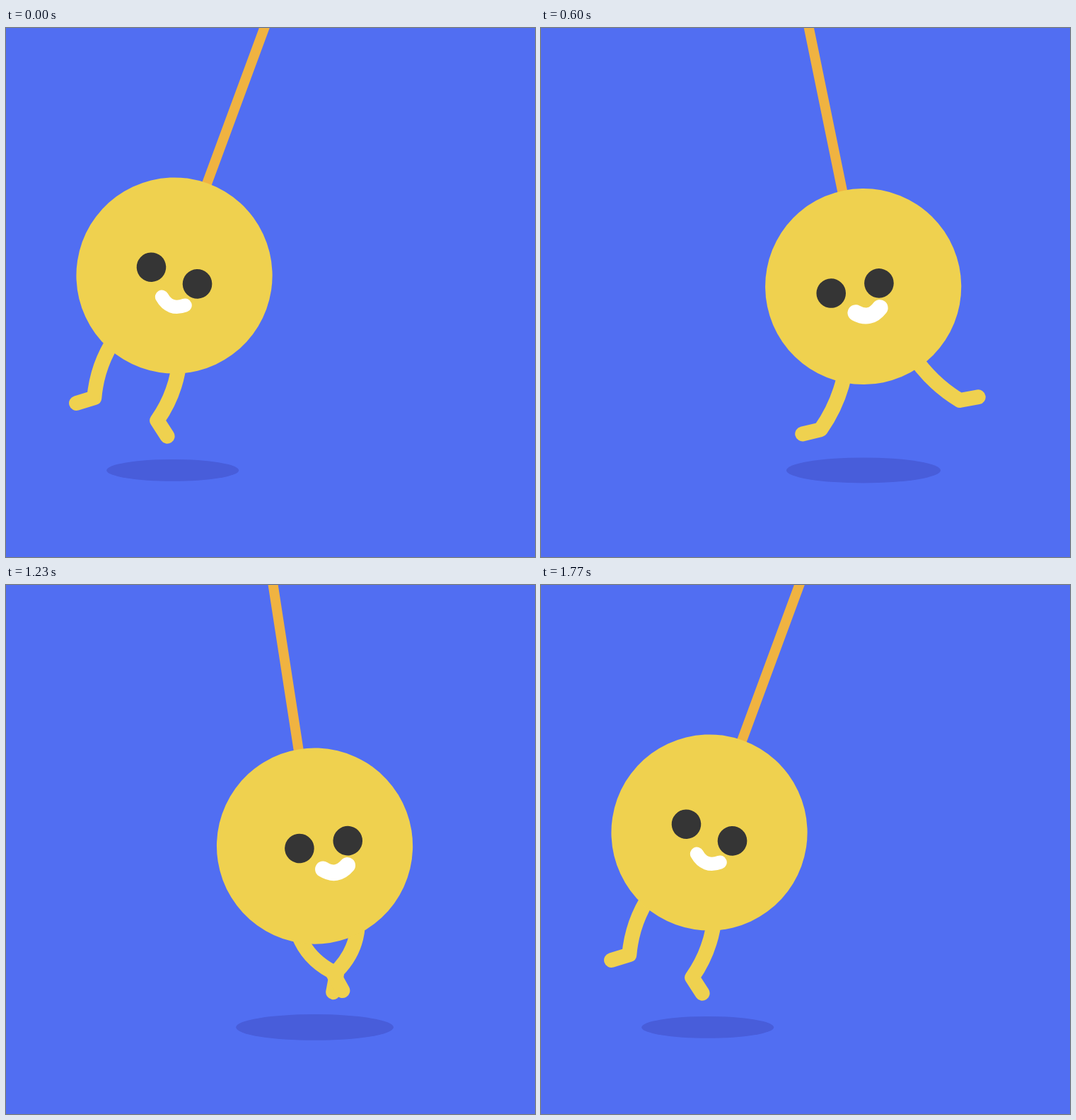
Recreate the animation shown at these times as an HTML page. Size 748 by 748 pixels, loop 1800 ms.

```html
<!DOCTYPE html>
<html lang="en">
<head>
<meta charset="utf-8">
<title>Swinging ball</title>
<style>
  html, body { margin: 0; width: 100%; height: 100%; overflow: hidden; background: #516ef2; }
  svg { display: block; width: 100%; height: 100%; }
  path, line { fill: none; stroke-linecap: round; stroke-linejoin: round; }
  .leg { stroke: #efd14f; stroke-width: 21; }
</style>
</head>
<body>
<svg viewBox="0 0 748 748">
  <ellipse id="shadow" cy="625.4" fill="#485dda"/>
  <g id="swing">
    <line x2="-1.4" y2="300" stroke="#f0b341" stroke-width="14"/>
    <g transform="translate(0 397.6)">
      <path class="leg" id="legL"/>
      <path class="leg" id="legR"/>
      <circle r="138.6" fill="#efd14f"/>
      <g id="face">
        <rect class="eye" x="-55.4" width="41.6" fill="#353535"/>
        <rect class="eye" x="13.8" width="41.6" fill="#353535"/>
        <path id="mouth" d="M-6.2 34.3Q11.2 49.3 28.6 34.3" stroke="#fff"/>
      </g>
    </g>
  </g>
</svg>
<script>
const LOOP = 1800, STEP = 30, TURN = 900, BACK = 870;
const $ = id => document.getElementById(id);
const eyes = document.querySelectorAll('.eye');
const set = (el, attrs) => {
  for (const key in attrs) el.setAttribute(key, attrs[key]);
};
const clamp = v => Math.min(1, Math.max(0, v));

// cubic-bezier(.5, 0, .5, 1)
function ease(x) {
  let lo = 0, hi = 1;
  for (let i = 0; i < 24; i++) {
    const s = (lo + hi) / 2;
    if (1.5 * s - 1.5 * s * s + s * s * s < x) lo = s; else hi = s;
  }
  return lo * lo * (3 - 2 * lo);
}

// Outward-facing leg, mirrored by side
function legPath(side, u, k) {
  const cross = -k * (1.35 + 0.35 * k);
  const hip = [45, 100];
  const ankle = [47.3 + (k > 0 ? 61.5 * k : -52 * cross), 201 - 20.5 * k * k];
  const turn = (53 + (k > 0 ? 41 * k : -35 * cross)) * Math.PI / 180;
  const toe = [ankle[0] + 26.4 * Math.sin(turn), ankle[1] + 26.4 * Math.cos(turn)];
  const dx = ankle[0] - hip[0], dy = ankle[1] - hip[1];
  const bow = 2 * (4.1 - 10.6 * Math.cos(Math.PI * (u - 0.6))) / Math.hypot(dx, dy);
  const bend = [hip[0] + dx / 2 + dy * bow, hip[1] + dy / 2 - dx * bow];
  const pt = ([x, y]) => `${(side * x).toFixed(2)} ${y.toFixed(2)}`;
  return `M${pt(hip)}Q${pt(bend)} ${pt(ankle)}L${pt(toe)}`;
}

function draw(t) {
  const u = t < TURN ? t / TURN : Math.min(2, 1 + (t - TURN) / BACK);
  const p = u < 1 ? ease(u) : 1 - ease(u - 1);
  const k = Math.sin(Math.PI * u);

  set($('swing'), { transform: `translate(374 -23.6) rotate(${20 - 40 * p})` });
  set($('face'), { transform: `translate(${-13.7 * k} 0)` });
  set($('mouth'), { 'stroke-width': 19.2 + 4.8 * p });
  set($('legL'), { d: legPath(-1, u, k) });
  set($('legR'), { d: legPath(1, u, k) });

  const rx = 93.5 + 20.7 * k * k;
  set($('shadow'), { cx: 235.7 + 276.6 * p, rx, ry: rx / 6.05 });

  const shut = clamp((t - 390) / 60) * clamp((570 - t) / 60);
  const h = 41.6 - 28.1 * shut;
  eyes.forEach(eye => set(eye, { y: -h / 2, height: h, rx: h / 2, ry: h / 2 }));
}

const start = performance.now();
function tick() {
  const t = (performance.now() - start) % LOOP;
  draw(Math.floor(t / STEP) * STEP);
  requestAnimationFrame(tick);
}
draw(0);
requestAnimationFrame(tick);
</script>
</body>
</html>
```
